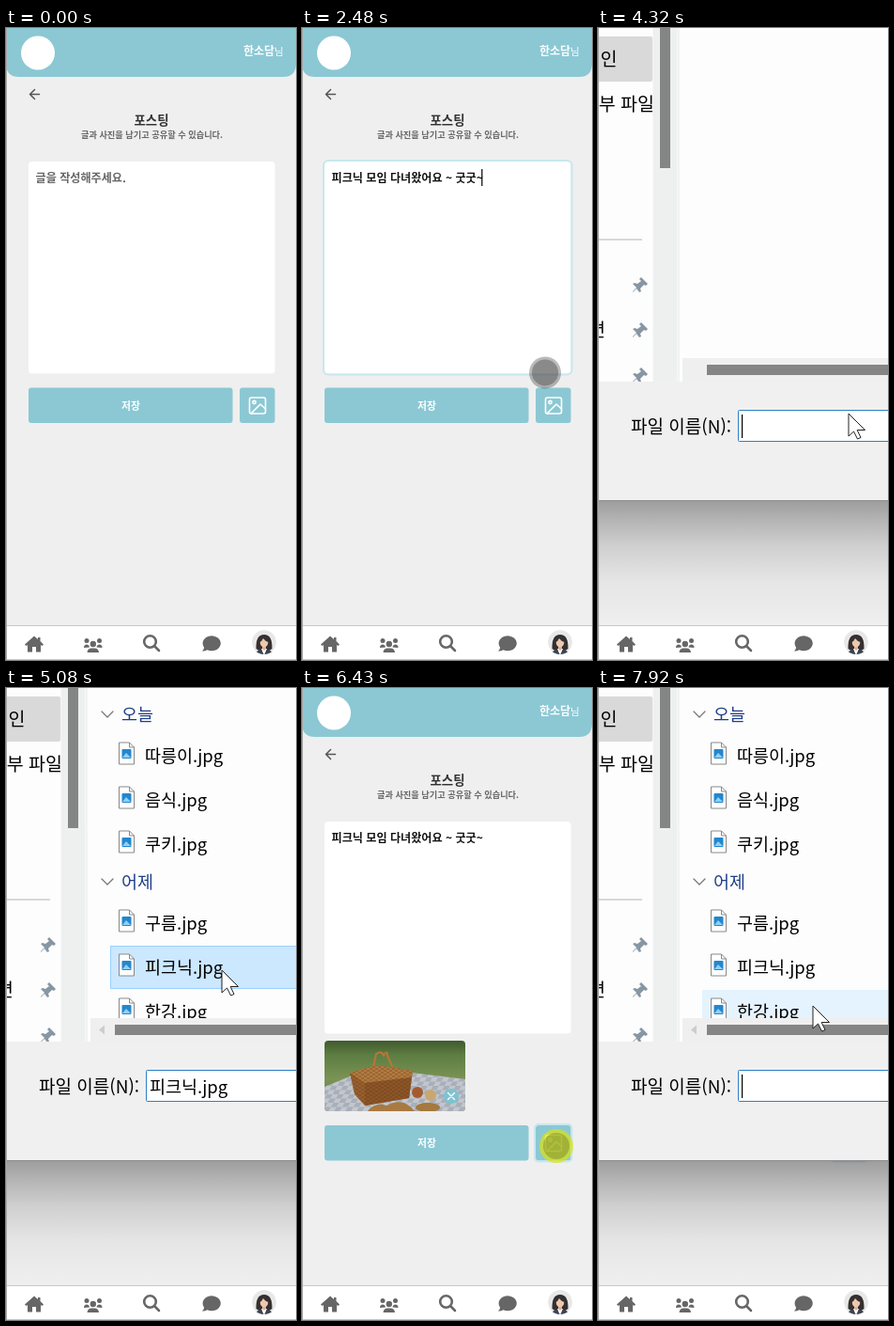
An HTML page for the animation above (7990 ms loop, 309 px wide and 672 px high).

```html
<!DOCTYPE html>
<html lang="ko">
<meta charset="utf-8">
<title>포스팅</title>
<style>
html, body { margin: 0; width: 100%; height: 100%; overflow: hidden; background: #efefef; }
svg { display: block; width: 100vw; height: 100vh; font-family: "Noto Sans CJK KR", "Noto Sans CJK", sans-serif; }
.page text { font-weight: 700; }
.line { fill: none; stroke-linecap: round; stroke-linejoin: round; }
#dialog text { font-size: 18.5px; font-weight: 350; }
#dialog .side text { font-size: 19.5px; }
</style>
<svg viewBox="0 0 309 672">
  <defs>
    <linearGradient id="shade" x2="0" y2="1">
      <stop stop-opacity=".34"/><stop offset=".2" stop-opacity=".22"/><stop offset=".37" stop-opacity=".13"/>
      <stop offset=".65" stop-opacity=".04"/><stop offset="1" stop-opacity="0"/>
    </linearGradient>
    <linearGradient id="lawn" x2="0" y2="1">
      <stop stop-color="#3f5a2c"/><stop offset=".2" stop-color="#5d7d42"/><stop offset=".55" stop-color="#7b9455"/><stop offset="1" stop-color="#56703a"/>
    </linearGradient>
    <pattern id="weave" width="6" height="4" patternUnits="userSpaceOnUse">
      <path d="M0 1H3M3 3H6" stroke="#5e3517" stroke-width="1" stroke-opacity=".55"/>
    </pattern>
    <pattern id="check" width="12" height="9" patternUnits="userSpaceOnUse" patternTransform="skewX(-30)">
      <path d="M0 0h6v4.500h-6zM6 4.500h6v4.500h-6z" fill="#8c97a8" fill-opacity=".5"/>
    </pattern>
    <clipPath id="frame"><rect x="24" y="375" width="150" height="75" rx="4"/></clipPath>
    <clipPath id="face"><circle cx="275" cy="653" r="13"/></clipPath>
    <g id="pin" fill="#8796a3"><path d="M1-8L8-1L6 1L4 0L0 4L1 7L-1 8L-4 4L-8 8L-8 7L-4 3L-8-1L-6-2L-3-1L1-4L-1-6Z"/></g>
    <g id="file">
      <path d="M120.500-12h11l5 5v18h-16z" fill="#fff" stroke="#888"/><path d="M131.500-12v5h5" fill="none" stroke="#888"/>
      <rect x="123.500" y="-5" width="10" height="10" rx="1" fill="#2387cf"/><path d="M124 4l4-5 5 5z" fill="#8fd0f5"/>
    </g>
  </defs>

  <g class="page">
    <rect width="309" height="672" fill="#efefef"/>
    <path d="M0 0H309V38Q309 52 295 52H14Q0 52 0 38Z" fill="#8bc8d4"/>
    <circle cx="34" cy="26.500" r="18" fill="#fff"/>
    <g fill="#fff"><text x="286" y="29" font-size="12" text-anchor="end">한소담</text><text x="286" y="29" font-size="10.500" style="font-weight:500">님</text></g>
    <path class="line" d="M35.500 70.500H26M30.500 65.500l-5 5 5 5" stroke="#555" stroke-width="1.500"/>
    <g text-anchor="middle">
      <text x="155" y="102.500" font-size="13.400" fill="#333">포스팅</text>
      <text x="155.500" y="117" font-size="9.200" fill="#666">글과 사진을 남기고 공유할 수 있습니다.</text>
    </g>
    <rect x="24" y="142" width="262.500" height="225.500" rx="4" fill="#fff"/>
    <rect id="areaRing" x="23" y="141" width="264.500" height="227.500" rx="5" fill="none" stroke="#c8e7ed" stroke-width="2"/>
    <text id="note" x="31.500" y="164" font-size="12.100"></text>
    <rect id="caret" y="150" width="1.200" height="18"/>

    <g id="photo" clip-path="url(#frame)">
      <rect x="24" y="375" width="150" height="75" fill="url(#lawn)"/>
      <path id="cloth" d="M24 424L56 411L116 409L174 416V450H24Z" fill="#c3c6cc"/>
      <path d="M24 424L56 411L116 409L174 416V450H24Z" fill="url(#check)"/>
      <path class="line" d="M76 403L79 389Q85 385 87 391Q91 384 91 391L96 402" stroke="#b97636" stroke-width="2"/>
      <path d="M51 409L80 401L118 407L114 436L67 444L56 432Z" fill="#98602e"/>
      <path d="M51 409L80 401L118 407L117 414L67 420Z" fill="#b27a40"/>
      <path d="M67 420L117 414L114 436L67 444Z" fill="#8d5526"/>
      <path d="M51 409L80 401L118 407L114 436L67 444L56 432Z" fill="url(#weave)"/>
      <path d="M70 450Q78 440 90 444Q108 434 120 450Z" fill="#a87a42"/>
      <circle cx="123" cy="430" r="6" fill="#a35a2e"/><circle cx="137" cy="433" r="6" fill="#c8a870"/>
      <ellipse cx="134" cy="446" rx="13" ry="5" fill="#a5793f"/>
      <circle cx="159" cy="434" r="8" fill="#7fc2d0"/>
      <path class="line" d="M155.500 430.500l7 7m0-7l-7 7" stroke="#fff" stroke-width="1.300"/>
    </g>

    <g id="buttons">
      <rect x="24" y="382.500" width="217.500" height="37.500" rx="3" fill="#8bc8d4"/>
      <text x="133" y="405.500" font-size="10.800" fill="#fff" text-anchor="middle">저장</text>
      <rect x="249" y="382.500" width="37.500" height="37.500" rx="3" fill="#8bc8d4"/>
      <rect id="buttonRing" x="248" y="381.500" width="39.500" height="39.500" rx="4" fill="none" stroke="#c8e7ed" stroke-width="2"/>
      <g class="line" stroke="#fff" stroke-width="1.600">
        <rect x="259.500" y="393" width="17" height="17" rx="2"/><circle cx="264.500" cy="398" r="1.600"/><path d="M261 410L271 400L276.500 405"/>
      </g>
    </g>
  </g>

  <g id="dialog">
    <rect x="-120" y="503" width="560" height="132" fill="url(#shade)"/>
    <rect x="-120" y="-60" width="560" height="436" fill="#fdfdfd"/>
    <rect x="-120" y="9" width="178" height="48" rx="2" fill="#d9d9d9"/>
    <g class="side" text-anchor="end">
      <text x="20.500" y="40">개인</text><text x="60" y="88">첨부 파일</text>
      <text x="1" y="280">다운로드</text><text x="8" y="328">바탕 화면</text>
    </g>
    <path d="M-120 225H47" stroke="#ccc" stroke-width="1.500"/>
    <use href="#pin" x="45" y="273"/><use href="#pin" x="45" y="321"/><use href="#pin" x="45" y="369"/>
    <rect x="58.500" y="-60" width="26" height="436" fill="#eef0ef"/>
    <rect x="66" y="-60" width="11" height="209" fill="#858585"/>
    <rect x="85" y="-60" width="2" height="436" fill="#f2f2f2"/>
    <rect id="hover" x="111" width="300" height="46" fill="#e5f3ff"/>
    <rect id="chosen" x="111.500" y="274.500" width="300" height="45" fill="#cce8ff" stroke="#99d1ff"/>
    <g id="list"></g>
    <rect x="90" y="351" width="350" height="25" fill="#efefef"/>
    <path id="scroll" d="M105 358.500v10l-6-5z" fill="#ccc"/>
    <rect x="116" y="358" width="300" height="11" fill="#858585"/>
    <rect x="-120" y="376" width="560" height="127" fill="#f0f0f0"/>
    <path d="M-120 502.500H440" stroke="#8e8e8e"/>
    <text x="35" y="430.500" style="font-size:19px">파일 이름(N):</text>
    <rect x="149.500" y="406.500" width="280" height="33" rx="1" fill="#fff" stroke="#2b80c8"/>
    <text id="fileName" x="153" y="430.500">피크닉.jpg</text>
    <rect id="fileCaret" x="153" y="411" width="1.200" height="25"/>
  </g>

  <g fill="#666">
    <rect y="635" width="309" height="37" fill="#fff"/>
    <path d="M0 635.500H309M0 671.500H309" stroke="#c8c8c8"/>
    <path d="M30 646.500L20 655.500L21.500 657L23 656V663.500H28V658H32V663.500H37V656L38.500 657L40 655.500L36.500 652V648H34V650Z"/>
    <circle cx="86" cy="651.500" r="2.500"/><circle cx="99.500" cy="651.500" r="2.500"/><circle cx="92.800" cy="655" r="3.200"/>
    <path d="M83 659Q83 655.500 86 655.500Q88.500 655.500 89 658.500ZM102.500 659Q102.500 655.500 99.500 655.500Q97 655.500 96.500 658.500ZM86.500 664Q87 659.500 91 659.500H94.500Q98.500 659.500 99 664Z"/>
    <g class="line" stroke="#666" stroke-width="2.600"><circle cx="153.500" cy="652.500" r="6.300"/><path d="M158.500 657.500L163 662"/></g>
    <path d="M209 662.500Q211.500 660 211 658.500A9.600 8 0 1 1 214.500 661.300Q212 662.800 209 662.500Z"/>
    <g clip-path="url(#face)">
      <circle cx="275" cy="653" r="13" fill="#e8e8e8"/>
      <path d="M266.500 660Q266 645 275 645Q284 645 283.500 660Q279 664 275 662Q271 664 266.500 660Z" fill="#35302f"/>
      <path d="M265 668Q265.500 661 275 660Q284.500 661 285 668Z" fill="#3d4350"/>
      <path d="M272 660h6l-3 7z" fill="#fff"/><path d="M273 656h4v4l-2 2l-2-2z" fill="#dcae94"/>
      <ellipse cx="275" cy="653.500" rx="4.200" ry="5" fill="#ecc8b0"/>
      <path d="M270 653Q271 647 276 648Q280 649 280 653Q276 652 274 649Q273 652 270 653Z" fill="#35302f"/>
    </g>
  </g>
  <path d="M.5 0V672" stroke="#aaa"/>

  <g id="touch"><circle id="halo" r="17"/><circle id="core" r="14"/></g>
  <path id="arrow" d="M0 0V24L5.500 19L9.500 27L13 25.500L9.200 17.500H17.500Z" fill="#fff" stroke="#222" stroke-linejoin="round"/>
  <g id="spinner" fill="none" stroke-width="4"><circle r="9" stroke="#9cc9e8"/><path d="M0-9A9 9 0 0 1 9 0" stroke="#1c7fd0"/></g>
</svg>
<script>
const LOOP = 7990;
const el = Object.fromEntries([...document.querySelectorAll('[id]')].map(e => [e.id, e]));
const show = (e, on) => e.style.display = on ? '' : 'none';
const move = (e, x, y, extra = '') => e.setAttribute('transform', `translate(${x} ${y}) ${extra}`);
const within = (t, a, b) => t >= a && t < b;
const ramp = (t, a, b) => Math.min(1, Math.max(0, (t - a) / (b - a)));

const group = (name, y) => `<path class="line" d="M102 ${y - 3}l6 6 6-6" stroke="#777" stroke-width="1.3"/>
  <text x="123" y="${y + 7}" fill="#1e3f86">${name}</text>`;
const file = (name, y) => `<use href="#file" y="${y - 2}"/><text x="148" y="${y + 7}">${name}.jpg</text>`;
el.list.innerHTML = group('오늘', 28) + group('어제', 206) +
  [['따릉이', 72], ['음식', 119], ['쿠키', 166], ['구름', 250], ['피크닉', 297], ['한강', 344]].map(f => file(...f)).join('');

// pointer stops: time, x, y
const path = [
  [530, 290, 647], [670, 264, 510], [800, 234, 365], [870, 223, 305], [930, 211, 261], [1000, 190, 237], [1070, 176, 226],
  [2200, 176, 226], [2340, 213, 275], [2480, 259, 366], [2620, 263, 423], [2740, 263, 423], [3010, 267, 410],
  [4660, 267, 410], [5000, 230, 300], [5560, 230, 300], [6040, 271, 487],
  [7520, 271, 487], [7920, 229, 338]
];
function pointer(t) {
  const i = path.findIndex(p => p[0] > t);
  if (i < 0) return path.at(-1).slice(1);
  if (!i) return path[0].slice(1);
  const [a, b] = [path[i - 1], path[i]], k = ramp(t, a[0], b[0]);
  return [a[1] + (b[1] - a[1]) * k, a[2] + (b[2] - a[2]) * k];
}

function draw(t) {
  const [x, y] = pointer(t);

  // page
  const typed = t >= 1990, focus = ramp(t, 1430, 1540) - ramp(t, 3290, 3440);
  el.note.textContent = typed ? '피크닉 모임 다녀왔어요 ~ 굿굿~' : '글을 작성해주세요.';
  el.note.setAttribute('fill', typed ? '#111' : '#666');
  el.areaRing.style.opacity = focus;
  show(el.caret, within(t, 1470, 1990) || within(t, 1990, 3300) && (t - 1990) % 1060 < 530);
  el.caret.setAttribute('x', typed ? 191.2 : 32);
  const attached = t >= 5720;
  show(el.photo, attached);
  move(el.buttons, 0, attached ? 82.5 : 0);
  el.buttonRing.style.opacity = ramp(t, 3290, 3440);

  // file dialog
  const open = ramp(t, 3950, 4180) - ramp(t, 5390, 5560) + ramp(t, 7130, 7390);
  show(el.dialog, open > 0);
  el.dialog.style.opacity = open;
  const scale = .925 + .075 * open;
  move(el.dialog, 215 * (1 - scale), 121 * (1 - scale), `scale(${scale})`);
  const filled = within(t, 4400, 5600) || t >= 7520, chosen = within(t, 5070, 5600);
  show(el.list, filled);
  show(el.scroll, filled);
  show(el.chosen, chosen);
  show(el.fileName, chosen);
  show(el.fileCaret, !chosen);
  show(el.hover, filled && !chosen && y < 351);
  el.hover.setAttribute('y', y < 320.5 ? 274 : 321);

  // pointer
  const busy = within(t, 3430, 3980) || within(t, 6700, 7170);
  const arrow = within(t, 3430, 5560) || t >= 6700;
  const click = within(t, 1260, 1470) || within(t, 3160, 3430) || within(t, 6430, 6700);
  show(el.touch, t >= 530 && !arrow);
  move(el.touch, x, y);
  el.halo.setAttribute('r', click ? 18 : 17);
  el.halo.setAttribute('fill', click ? 'rgba(225,228,0,.65)' : 'rgba(0,0,0,.27)');
  el.core.setAttribute('fill', click ? 'rgba(120,130,30,.45)' : 'rgba(90,90,90,.5)');
  show(el.arrow, arrow);
  move(el.arrow, x, y);
  show(el.spinner, busy);
  move(el.spinner, x + 22.5, y, `rotate(${t * .4 % 360})`);
}

const start = performance.now();
function tick() {
  draw((performance.now() - start) % LOOP);
  requestAnimationFrame(tick);
}
tick();
</script>
</html>
```
